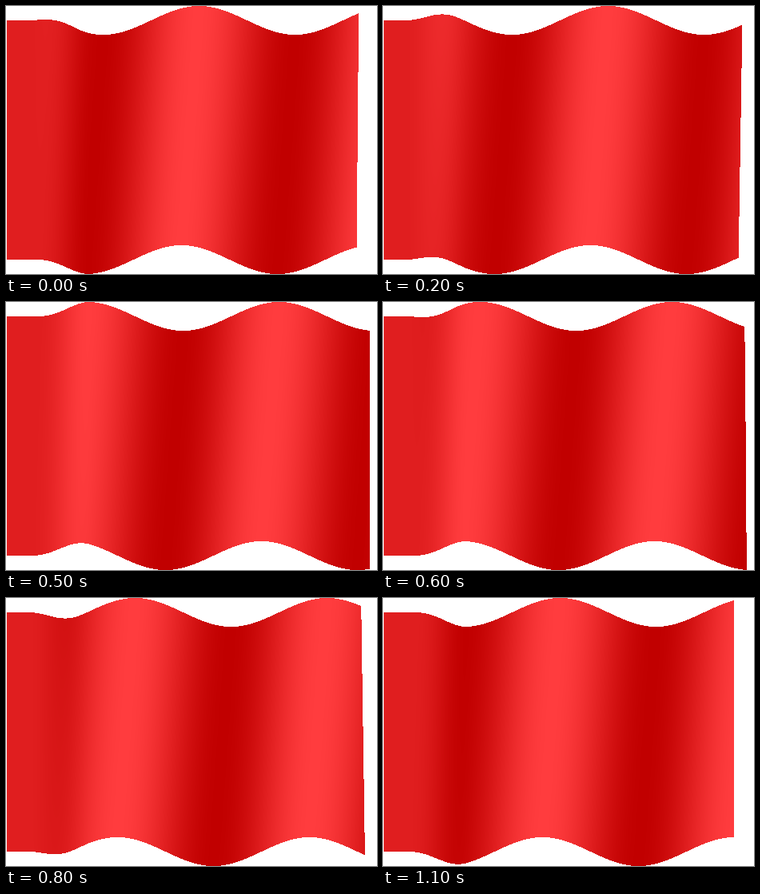
An HTML page with a canvas for the animation above (1.2 s loop, 464x336 px).

```html
<!DOCTYPE html>
<html lang="en">
<head>
<meta charset="utf-8">
<title>Waving flag</title>
<style>
  html, body { margin: 0; width: 100%; height: 100%; overflow: hidden; background: #fff; }
  canvas { display: block; }
</style>
</head>
<body>
<canvas id="stage" width="464" height="336"></canvas>
<script>
const W = 464, H = 336, STEPS = 12, STEP_MS = 100;
const WAVE = 240, AMP = 18, TOP = 18, HEIGHT = 300, SLANT = 22;
const ctx = document.getElementById('stage').getContext('2d');
const image = ctx.createImageData(W, H);
const TAU = 2 * Math.PI;

// The cloth is still at the pole and swings fully from x = 105 on.
function swing(x) {
  const t = Math.min(1, Math.max(0, (x - 28) / 77));
  return t * t * (3 - 2 * t);
}

// Wave height from -1 to 1; v runs from the top hem (0) to the bottom hem (1).
function wave(x, v, step) {
  const crest = 241 + step * WAVE / STEPS - SLANT * v;
  return swing(x) * Math.cos(TAU * (x - crest) / WAVE);
}

function freeEdge(v, step) {
  return 446.3 + 8.2 * Math.cos(TAU * (step - 4.4 - 1.1 * v) / STEPS);
}

function draw(step) {
  const px = image.data.fill(255);
  for (let x = 1; x < W; x++) {
    const top = TOP - AMP * wave(x, 0, step);
    const bottom = TOP + HEIGHT - AMP * wave(x, 1, step);
    for (let y = Math.max(0, Math.round(top)); y < Math.min(H, Math.round(bottom)); y++) {
      const v = (y - top) / (bottom - top);
      if (x > freeEdge(v, step)) continue;
      const h = wave(x, v, step), i = 4 * (y * W + x);
      px[i] = 224 + 31 * h;
      px[i + 1] = 30 + 30 * h;
      px[i + 2] = 31 + 31 * h;
    }
  }
  ctx.putImageData(image, 0, 0);
}

const start = performance.now();
let shown = -1;
function tick() {
  const step = Math.floor((performance.now() - start) / STEP_MS) % STEPS;
  if (step !== shown) draw(shown = step);
  requestAnimationFrame(tick);
}
tick();
</script>
</body>
</html>
```
